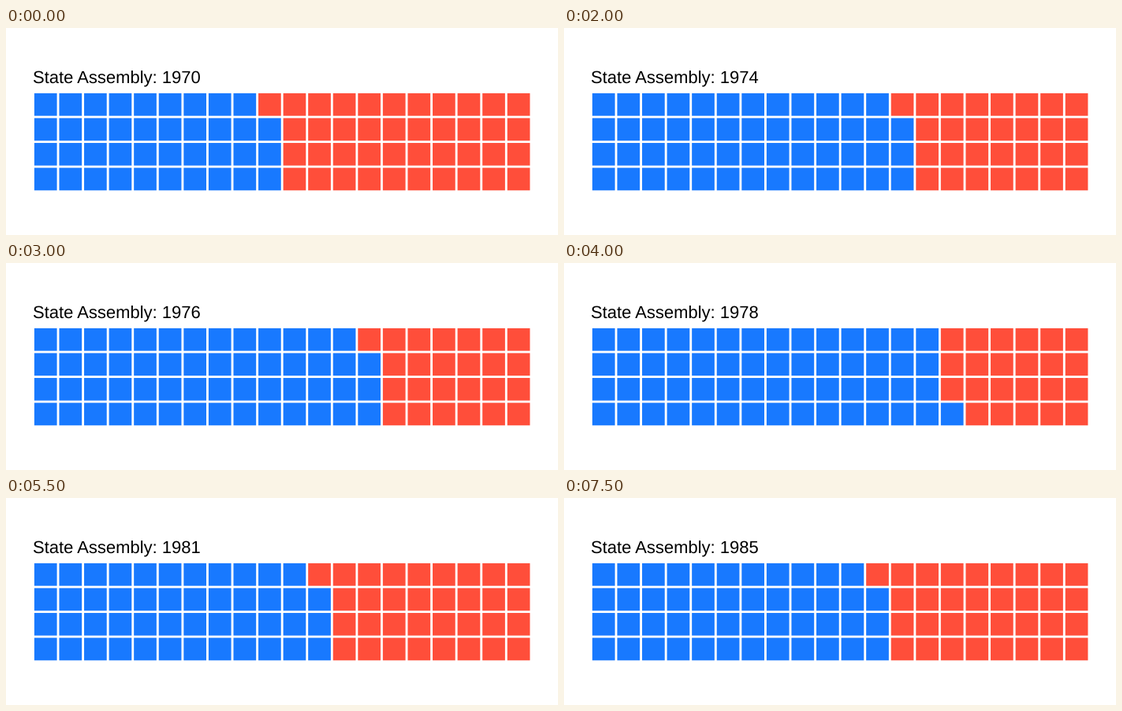
Recreate the animation shown at these times as a matplotlib script. Size 700x263 px, loop 8000 ms.

```python
import matplotlib.pyplot as plt
from matplotlib.animation import FuncAnimation
from matplotlib.patches import Rectangle

W, H, DPI = 700, 263, 100
COLS, ROWS = 20, 4
LEFT, TOP, PITCH, CELL = 35.9, 82.9, 31.57, 28.7
BLUE, RED = "#1879ff", "#ff4e3a"
FIRST_YEAR = 1970
BLUE_SEATS = [39, 43, 43, 51, 51, 55, 55, 57, 57, 50, 50, 47, 47, 48, 48, 47]

plt.rcParams["text.hinting"] = "none"
fig = plt.figure(figsize=(W / DPI, H / DPI), dpi=DPI, facecolor="white")
ax = fig.add_axes([0, 0, 1, 1])
ax.set_xlim(0, W)
ax.set_ylim(H, 0)
ax.axis("off")

title = ax.text(34.2, 70.7, "", family="Liberation Sans", color="black",
                fontsize=22 * 72 / DPI, va="baseline")

# Seats run column by column, each column from the bottom up.
seats = []
for col in range(COLS):
    for row in reversed(range(ROWS)):
        seat = Rectangle((LEFT + col * PITCH, TOP + row * PITCH), CELL, CELL,
                         linewidth=0, snap=False)
        seats.append(ax.add_patch(seat))


def update(i):
    title.set_text(f"State Assembly: {FIRST_YEAR + i}")
    for n, seat in enumerate(seats):
        seat.set_facecolor(BLUE if n < BLUE_SEATS[i] else RED)
    return [title, *seats]


anim = FuncAnimation(fig, update, frames=len(BLUE_SEATS), interval=500,
                     init_func=lambda: update(0), repeat=True, repeat_delay=0)
plt.show()
```
